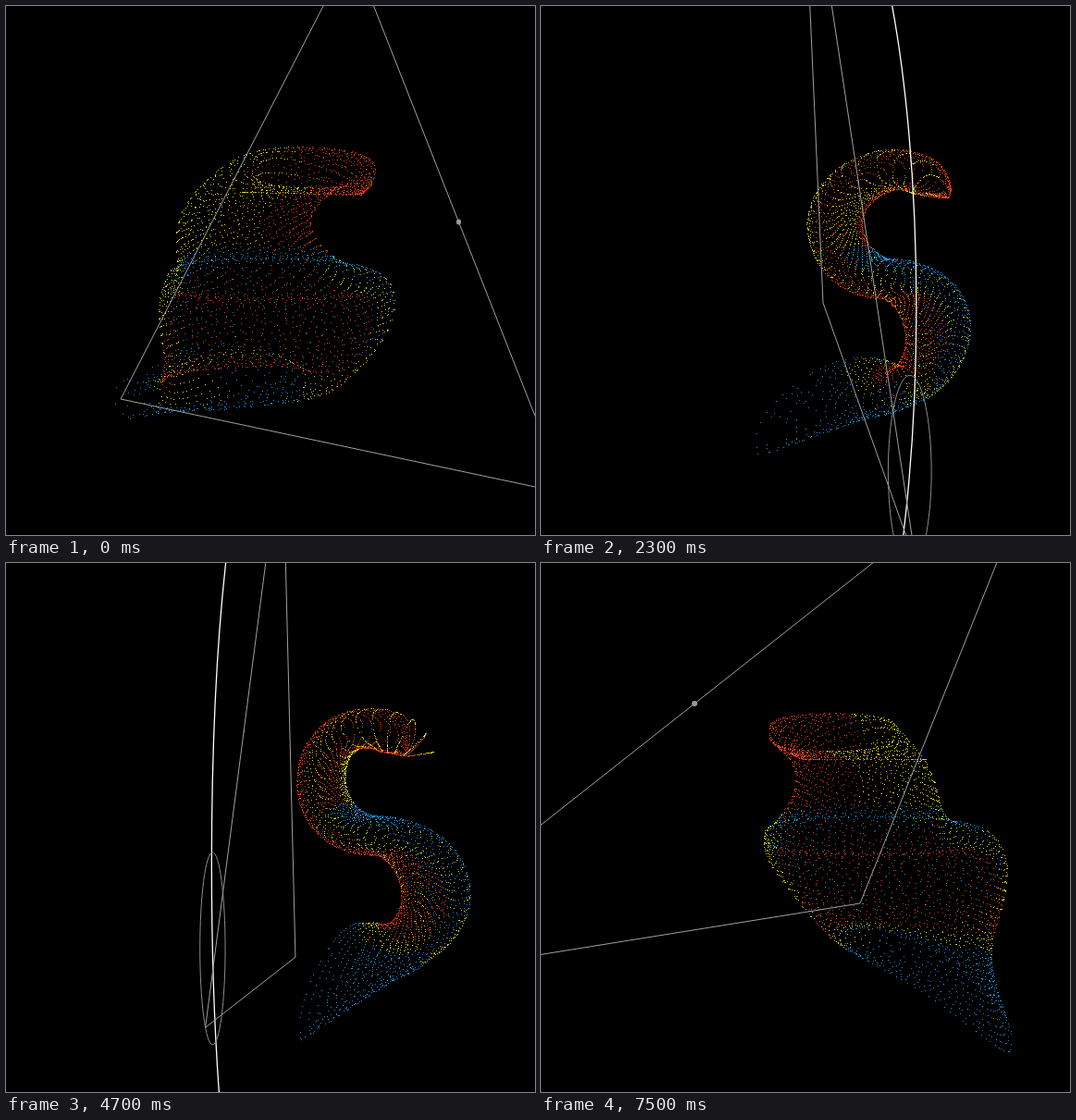
An HTML page with a canvas that plays this animation: 572 by 572 pixels, repeating every 7600 ms.

```html
<!DOCTYPE html>
<html>
<head>
<meta charset="utf-8">
<style>
  html, body { margin: 0; height: 100%; overflow: hidden; background: #000; }
  canvas { display: block; }
</style>
</head>
<body>
<canvas id="stage" width="572" height="572"></canvas>
<script>
const ctx = document.getElementById('stage').getContext('2d');
const { sin, cos, PI, abs, sign, sqrt, min, max, floor, exp } = Math;
const LOOP = 7600, STEP = 100, RAD = PI / 180;
const AXIS = 290, MID_Y = 286, VIEW = 2500;   // turning axis, horizon, camera distance
const ORBIT = 515, ORBIT_Y = 326, WHEEL = 104;

// Hand-turned camera: [ms, degrees]
const TURN = [[0, -60], [1500, -29.7], [2300, -13], [3800, 3.5],
  [4800, 8], [5400, 23.5], [6400, 61], [7500, 86]];
// Triangle: [ms, apex x, apex y, corner x, corner y, wheel phase]
const POSES = [
  [0, 374, -60, 124, 425, 190],
  [1500, 345, -81, 212, 413, 578],
  [2300, 281, -221, 305, 321, 793],
  [3800, 309, -98, 309, 470, 1219],
  [5400, 291, -172, 316, 392, 1710],
  [6400, 434, -47, 430, 518, 1954],
  [7500, 555, -155, 345, 368, 2250]];

function keyed(keys, t) {
  let i = 1;
  while (i < keys.length - 1 && keys[i][0] < t) i++;
  const a = keys[i - 1], b = keys[i], f = min(1, (t - a[0]) / (b[0] - a[0]));
  return a.slice(1).map((v, k) => v + (b[k + 1] - v) * f);
}

const bump = (s, at, width) => exp(-(((s - at) / width) ** 2));

let seed = 7;
function random() {
  seed = (seed * 16807) % 2147483647;
  return seed / 2147483647;
}

// S-shaped spine: two arcs of one radius and a straight tail.
// Returns the position and the unit tangent.
function spine(s) {
  const r = 58, cx = 100, upper = r * 240 * RAD, d = s * 480;
  if (d < upper) {
    const q = -30 * RAD - d / r;
    return [cx + r * cos(q), 237 + r * sin(q), sin(q), -cos(q)];
  }
  const q = (d - upper) / r - PI / 2, over = max(0, q - PI / 2) * r;
  if (over) return [cx - over, 411 + .2 * over, -1, 0];
  return [cx + r * cos(q), 353 + r * sin(q), -sin(q), cos(q)];
}

function color(s, side, deep, tail) {
  const heat = s < .4
    ? max(0, .45 - .9 * deep + .2 * side)
    : side - .1 + .7 * bump(s, .8, .08) - 2 * tail;
  const hue = heat > .35 ? 12 : heat > -.35 ? 58 : 202;
  return `hsl(${hue + 14 * (random() - .5)}, 82%, ${40 + 14 * random()}%)`;
}

// Slanted flat rings strung along the spine
function buildCloud() {
  const dots = [], rings = 52, perRing = 72;
  for (let i = 0; i < rings; i++) for (let j = 0; j < perRing; j++) {
    const s0 = i / (rings - 1), psi = (j + random() * .8) / perRing * 2 * PI;
    const deep = cos(psi), side = sin(psi);
    const s = s0 + .1 * deep * min(1, 8 * s0);
    const [x, y, tx, ty] = spine(s);
    const tail = max(0, s - .82) * 5;
    const w = (21 + 6 * tail) * sqrt(min(1, max(0, s) * 16)) * sign(side) * sqrt(abs(side));
    const mid = 145 * s - 12 + 65 * exp(-14 * s) + 25 * bump(s, .3, .1);
    const half = 70 + 65 * bump(s, .62, .2);
    dots.push({
      x: x - ty * w, y: y + tx * w, z: mid + half * deep,
      tail, deep, color: color(s, side, deep, tail), rank: random()
    });
  }
  return dots;
}
const cloud = buildCloud();

function drawCloud(t, angle) {
  const c = cos(angle), s = sin(angle), age = t / LOOP;
  for (const p of cloud) {
    if (p.rank < p.tail * .8 * (1 - age)) continue;   // the tail fills in
    const scale = 1 / (1 - (p.z * c - p.x * s) / VIEW);
    const y = p.y + p.tail * (60 * age - 30 + 30 * p.deep);
    ctx.fillStyle = p.color;
    ctx.fillRect(floor(AXIS + (p.x * c + p.z * s) * scale),
      floor(MID_Y + (y - MID_Y) * scale), 1, 1);
  }
}

function stroke(style, width, path) {
  ctx.strokeStyle = style;
  ctx.lineWidth = width;
  ctx.beginPath();
  path();
  ctx.stroke();
}

function drawRig(t, angle) {
  const [ax, ay, cx, cy, phase] = keyed(POSES, t);
  const s = sin(angle), f = t / LOOP;
  const wheelY = 545 - 190 * f * f * (3 - 2 * f);
  const wheelX = AXIS - ORBIT * s * sqrt(1 - ((wheelY - ORBIT_Y) / ORBIT) ** 2);
  const bx = wheelX - WHEEL * s * cos(phase * RAD);
  const by = wheelY + WHEEL * sin(phase * RAD);

  stroke('#fff', 1.3, () =>
    ctx.ellipse(AXIS, ORBIT_Y, abs(ORBIT * s), ORBIT, 0, -PI / 2, PI / 2, s > 0));
  stroke('#8c8c8c', 1, () => ctx.ellipse(wheelX, wheelY, abs(WHEEL * s), WHEEL, 0, 0, 2 * PI));
  stroke('#a0a0a0', 1, () => {
    ctx.moveTo(ax, ay);
    ctx.lineTo(bx, by);
    ctx.lineTo(cx, cy);
    ctx.closePath();
  });
  ctx.fillStyle = '#999';
  ctx.beginPath();
  ctx.ellipse((ax + bx) / 2, (ay + by) / 2, 3 * abs(s), 3, 0, 0, 2 * PI);
  ctx.fill();
}

const start = performance.now();
function frame() {
  const t = floor((performance.now() - start) % LOOP / STEP) * STEP;
  const angle = keyed(TURN, t)[0] * RAD;
  ctx.fillStyle = '#000';
  ctx.fillRect(0, 0, 572, 572);
  drawCloud(t, angle);
  drawRig(t, angle);
  requestAnimationFrame(frame);
}
frame();
</script>
</body>
</html>
```
